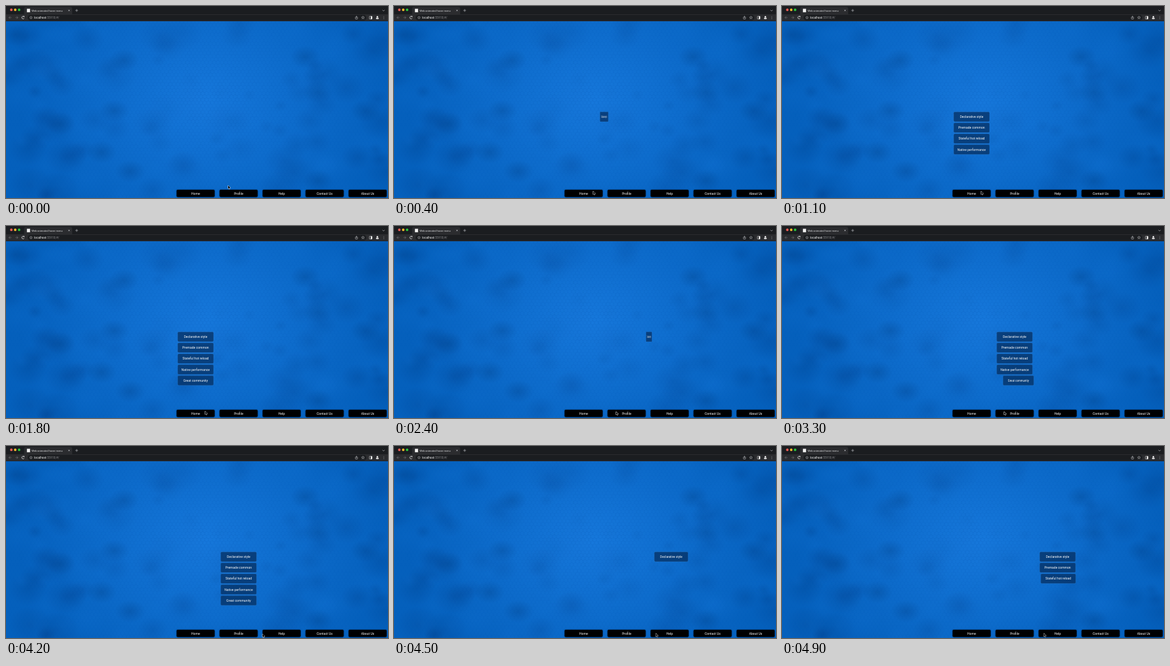
These frames come from a looping animation (600x302 px, 5 s). An HTML page with a canvas:

```html
<!DOCTYPE html>
<html lang="en">
<head>
<meta charset="utf-8">
<title>Hover menu</title>
<style>
html, body { margin: 0; width: 100%; height: 100%; overflow: hidden; background: #0660bd; }
canvas { display: block; }
</style>
</head>
<body>
<canvas id="stage" width="600" height="302"></canvas>
<script>
const W = 600, H = 302, LOOP = 5000, TAU = Math.PI * 2;
const ctx = document.getElementById('stage').getContext('2d');
const backdrop = document.createElement('canvas');
backdrop.width = W;
backdrop.height = H;

const buttons = ['Home', 'Profile', 'Help', 'Contact Us', 'About Us'];
const items = ['Declarative style', 'Premade common', 'Stateful hot reload', 'Native performance', 'Great community'];
const menus = [
  { button: 0, start: 385, step: 180, end: 2300 },
  { button: 1, start: 2390, step: 205, end: 4320 },
  { button: 2, start: 4385, step: 190, end: 5000 }
];
// time, x, y of the pointer tip
const pointerPath = [
  [0, 349, 282.5], [60, 349, 282.5], [380, 312.8, 291.5], [1900, 312.8, 291.5],
  [2350, 348.8, 292], [3800, 348.8, 292], [4200, 403, 295.8], [4330, 411.4, 294.8], [5000, 411.4, 294.8]
];
const buttonCenter = i => 297.8 + i * 67.55;

function box(c, x, y, w, h, r, fill, stroke) {
  c.beginPath();
  c.roundRect(x, y, w, h, r);
  if (fill) { c.fillStyle = fill; c.fill(); }
  if (stroke) { c.strokeStyle = stroke; c.stroke(); }
}

function dot(c, x, y, r, fill) {
  c.beginPath();
  c.arc(x, y, r, 0, TAU);
  c.fillStyle = fill;
  c.fill();
}

function lines(c, points, color, width = 0.6) {
  c.beginPath();
  points.forEach(([x, y], i) => i ? c.lineTo(x, y) : c.moveTo(x, y));
  c.strokeStyle = color;
  c.lineWidth = width;
  c.stroke();
}

function label(c, text, x, y, size, color = '#fff', align = 'center') {
  c.font = `${size}px Roboto, Arial, sans-serif`;
  c.textAlign = align;
  c.textBaseline = 'alphabetic';
  c.fillStyle = color;
  c.fillText(text, x, y);
}

function glow(c, x, y, rx, ry, rgb, alpha) {
  c.save();
  c.translate(x, y);
  c.scale(rx, ry);
  const g = c.createRadialGradient(0, 0, 0, 0, 0, 1);
  g.addColorStop(0, `rgba(${rgb},${alpha})`);
  g.addColorStop(0.5, `rgba(${rgb},${alpha * 0.5})`);
  g.addColorStop(1, `rgba(${rgb},0)`);
  c.fillStyle = g;
  c.fillRect(-1, -1, 2, 2);
  c.restore();
}

function drawWallpaper(c) {
  let seed = 17;
  const random = () => (seed = seed * 16807 % 2147483647) / 2147483647;
  c.fillStyle = '#0560bc';
  c.fillRect(0, 0, W, H);
  glow(c, 310, 150, 290, 230, '28,128,230', 0.75);
  for (let i = 0; i < 130; i++) {
    const x = random() * W, y = 24 + random() * 278, r = 9 + random() * 22;
    const far = Math.min(1, Math.hypot((x - 310) / 250, (y - 150) / 190));
    const dark = random() < 0.6;
    glow(c, x, y, r * 1.2, r, dark ? '0,58,130' : '20,120,220', (dark ? 0.23 : 0.14) * far);
  }
  [[185, 85], [150, 230], [565, 165], [490, 135], [470, 80], [85, 185], [195, 260], [170, 165], [15, 45], [490, 275]]
    .forEach(([x, y]) => glow(c, x, y, 24, 18, '0,55,120', 0.28));
  c.lineWidth = 0.6;
  for (let row = 0; row < 58; row++) {
    for (let col = 0; col < 101; col++) {
      const x = col * 6 + row % 2 * 3, y = 25 + row * 4.9;
      const fade = 1 - Math.hypot((x - 310) / 290, (y - 150) / 190);
      const alpha = 0.025 + 0.13 * Math.max(0, fade) * (0.5 + random());
      lines(c, [[x - 3, y + 1.6], [x - 3, y - 1.6], [x, y - 3.3], [x + 3, y - 1.6]], `rgba(0,70,155,${alpha})`);
    }
  }
}

function drawBrowser(c) {
  const grey = '#c5c7ca', dim = '#77797d';
  c.fillStyle = '#1b1d20';
  c.fillRect(0, 0, W, 24);
  c.fillStyle = '#2b2c2f';
  c.fillRect(0, 13, W, 10.6);
  box(c, 28.5, 1.5, 75.5, 13, 3, '#2b2c2f');
  ['#fe5f57', '#febc2e', '#28c840'].forEach((color, i) => dot(c, 8.4 + i * 6.1, 6, 2, color));
  c.fillStyle = '#f1f1f1';
  c.fillRect(32.8, 4.4, 5, 5.4);
  label(c, 'Web animated hover menu', 40.3, 8.6, 4.1, '#e4e5e7', 'left');
  lines(c, [[97.8, 5.8], [100.2, 8.2]], grey);
  lines(c, [[100.2, 5.8], [97.8, 8.2]], grey);
  lines(c, [[108.8, 7], [113.2, 7]], grey);
  lines(c, [[111, 4.8], [111, 9.2]], grey);
  lines(c, [[591.2, 6.2], [593, 8], [594.8, 6.2]], grey);

  box(c, 34, 14, 532, 8.8, 4.4, '#1b1d20');
  [[6.6, 1, dim], [16.8, -1, dim]].forEach(([x, dir, color]) => {
    lines(c, [[x - 2, 18.2], [x + 2, 18.2]], color);
    lines(c, [[x, 16.2], [x - 2 * dir, 18.2], [x, 20.2]], color);
  });
  c.strokeStyle = '#e4e5e7';
  c.lineWidth = 0.8;
  c.beginPath();
  c.arc(26.8, 18.2, 2, 0.5, 5.5);
  c.stroke();
  box(c, 27.4, 15.8, 1.5, 1.5, 0, '#e4e5e7');
  c.strokeStyle = grey;
  c.lineWidth = 0.5;
  c.beginPath();
  c.arc(39.3, 18.2, 1.8, 0, TAU);
  c.stroke();
  lines(c, [[39.3, 17.8], [39.3, 19.2]], grey);
  label(c, 'localhost', 44.2, 19.9, 4.7, '#f1f2f3', 'left');
  label(c, ':55918/#/', 44.2 + c.measureText('localhost').width, 19.9, 4.5, '#85878b', 'left');

  c.lineWidth = 0.6;
  box(c, 548.8, 17.2, 3.4, 3.3, 0.5, null, grey);
  lines(c, [[550.5, 18.8], [550.5, 15.5]], grey);
  const star = Array.from({ length: 11 }, (_, i) => {
    const a = i * Math.PI / 5 - Math.PI / 2, r = i % 2 ? 1.1 : 2.5;
    return [560.7 + r * Math.cos(a), 18.3 + r * Math.sin(a)];
  });
  lines(c, star, grey, 0.5);
  box(c, 570.8, 16.2, 4.2, 4.2, 0.3, null, '#fff');
  box(c, 573, 16.2, 2, 4.2, 0, '#fff');
  dot(c, 583.3, 16.9, 1.2, '#fff');
  box(c, 581.2, 18.6, 4.2, 1.9, 0.8, '#fff');
  [16.4, 18.2, 20].forEach(y => dot(c, 593.2, y, 0.45, grey));
}

function drawButtons(c) {
  buttons.forEach((text, i) => {
    const x = buttonCenter(i);
    c.shadowColor = 'rgba(0,25,65,.7)';
    c.shadowBlur = 2;
    box(c, x - 29.9, 288.9, 59.8, 11.7, 1.8, '#000');
    c.shadowBlur = 0;
    label(c, text, x, 296.5, 5.05);
  });
}

// Each entry slides in from the right while widening.
function drawMenu(menu, time) {
  if (time < menu.start || time >= menu.end) return;
  items.forEach((text, i) => {
    const t = Math.min(1, (time - menu.start - i * menu.step) / 190);
    if (t <= 0) return;
    const scale = 1 - (1 - t) ** 3;
    ctx.save();
    ctx.translate(buttonCenter(menu.button) + 42 * (1 - scale), 174.2 + i * 17.2);
    ctx.scale(scale, 1);
    ctx.lineWidth = 0.7;
    box(ctx, -28.2, -7.7, 56.4, 15.4, 1.8, 'rgba(5,40,85,.68)', 'rgba(50,125,200,.5)');
    label(ctx, text, 0, 1.8, 5.05);
    ctx.restore();
  });
}

function drawPointer(time) {
  const next = pointerPath.findIndex(p => p[0] > time);
  const a = pointerPath[next - 1], b = pointerPath[next];
  const t = (time - a[0]) / (b[0] - a[0]), k = t * t * (3 - 2 * t);
  ctx.save();
  ctx.translate(a[1] + (b[1] - a[1]) * k, a[2] + (b[2] - a[2]) * k);
  ctx.beginPath();
  [[0, 0], [0, 4.8], [1.1, 3.8], [1.9, 5.6], [2.7, 5.2], [1.9, 3.5], [3.4, 3.4]]
    .forEach(([x, y]) => ctx.lineTo(x, y));
  ctx.closePath();
  ctx.lineWidth = 1;
  ctx.strokeStyle = '#e8e8e8';
  ctx.stroke();
  ctx.fillStyle = '#000';
  ctx.fill();
  ctx.restore();
}

const still = backdrop.getContext('2d');
drawWallpaper(still);
drawBrowser(still);
drawButtons(still);

function frame() {
  const time = performance.now() % LOOP;
  ctx.drawImage(backdrop, 0, 0);
  menus.forEach(menu => drawMenu(menu, time));
  drawPointer(time);
  requestAnimationFrame(frame);
}
frame();
</script>
</body>
</html>
```
